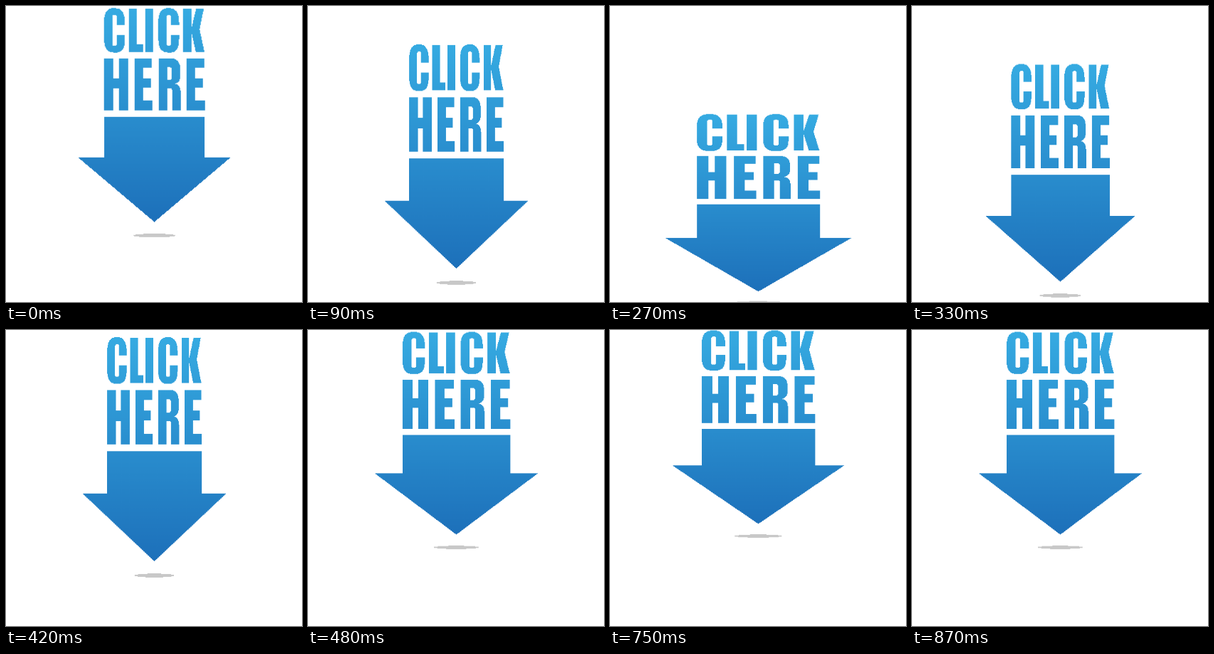
Animation, 416 px wide and 416 px high, one loop 900 ms. Source, as an HTML page:

```html
<!DOCTYPE html>
<html lang="en">
<head>
<meta charset="utf-8">
<title>Click here</title>
<style>
  html, body { margin: 0; width: 100%; height: 100%; overflow: hidden; background: #fff; }
  svg { display: block; width: 100vw; height: 100vh; shape-rendering: crispEdges; }
</style>
</head>
<body>
<svg viewBox="0 0 416 416" role="img" aria-label="CLICK HERE">
  <defs>
    <linearGradient id="blue" gradientUnits="userSpaceOnUse" x1="0" y1="0" x2="0" y2="267">
      <stop offset="0" stop-color="#36abe2"/>
      <stop offset="1" stop-color="#1d70ba"/>
    </linearGradient>
    <path id="C" d="M33.5 21.5H20.5V13C20.5 9.5 20 8.5 17 8.5S13.3 9.5 13.3 13V43C13.3 46.5 14 47.5 17 47.5S20.5 46 20.5 43V34H33.5V38C33.5 51 30 55.8 17 55.8S0 50 0 38V18C0 5 5 0 17 0S33.5 6 33.5 18Z"/>
    <path id="L" d="M0 1H13.3V45H23V55H0Z"/>
    <path id="I" d="M0 1H13.3V55H0Z"/>
    <path id="K" d="M0 1H13.3V25L20.5 1H33L26.2 26.5L34 55H20.2L13.3 31V55H0Z"/>
    <path id="H" d="M0 62.7H15V87.5H23.5V62.7H38.5V127.5H23.5V100H15V127.5H0Z"/>
    <path id="E" d="M0 62.7H28.4V74.5H14V87.5H26.5V99.5H14V115.5H29.2V127.5H0Z"/>
    <path id="R" fill-rule="evenodd" d="M0 62.7H18C30 62.7 35 67 35 77V83C35 90 33 93 27 94.5C33 96 35.5 99 35.5 105V127.5H21.8V104C21.8 101 21 100 18 100H14V127.5H0ZM14 74V90H17C20.5 90 21.5 89 21.5 86V78.5C21.5 75 20.5 74 17 74Z"/>
  </defs>
  <g id="sign" fill="url(#blue)">
    <use href="#C" x="-81"/>
    <use href="#L" x="-41.5"/>
    <use href="#I" x="-15"/>
    <use href="#C" x="6.3"/>
    <use href="#K" x="46.5"/>
    <use href="#H" x="-81"/>
    <use href="#E" x="-32.3"/>
    <use href="#R" x="6.8"/>
    <use href="#E" x="51.8"/>
    <path d="M-81 135.7H81V186.3H123L0 267L-123 186.3H-81Z"/>
    <ellipse cy="283.9" rx="34.3" ry="2.3" fill="#c8c8c8"/>
  </g>
</svg>
<script>
  const STEPS = 30, STEP_MS = 30, APEX = 675, LOOP = STEPS * STEP_MS;

  // Key points of the fall: ms after the apex, squash, centre y
  const KEYS = [
    [0, 0, 134.5], [75, -.018, 136.5], [195, -.067, 145], [255, -.18, 167.5],
    [345, -.146, 234.5], [405, .066, 276.5], [450, .115, 289]
  ];

  // Slope at a key; flat at both ends, where the motion turns back.
  function slope(i, col) {
    const prev = KEYS[i - 1], next = KEYS[i + 1];
    return prev && next ? (next[col] - prev[col]) / (next[0] - prev[0]) : 0;
  }

  function spline(ms, col) {
    const i = KEYS.findIndex(key => key[0] > ms) - 1;
    const a = KEYS[i], b = KEYS[i + 1];
    const span = b[0] - a[0], u = (ms - a[0]) / span, v = 1 - u;
    return a[col] * v * v * (1 + 2 * u) + b[col] * u * u * (1 + 2 * v)
      + span * u * v * (slope(i, col) * v - slope(i + 1, col) * u);
  }

  // The rise mirrors the fall, so a pose depends only on its distance from the apex.
  function pose(step) {
    const gap = Math.abs(step * STEP_MS - APEX);
    const ms = Math.min(gap, LOOP - gap);
    const squash = spline(ms, 1), y = spline(ms, 2);
    return `translate(208.5px, ${y}px) scale(${1 + squash}, ${1 - squash}) translate(0px, -133.5px)`;
  }

  const frames = Array.from({ length: STEPS + 1 }, (_, i) => ({
    offset: i / STEPS,
    transform: pose(i % STEPS),
    easing: 'step-end'
  }));

  document.getElementById('sign').animate(frames, { duration: LOOP, iterations: Infinity });
</script>
</body>
</html>
```
